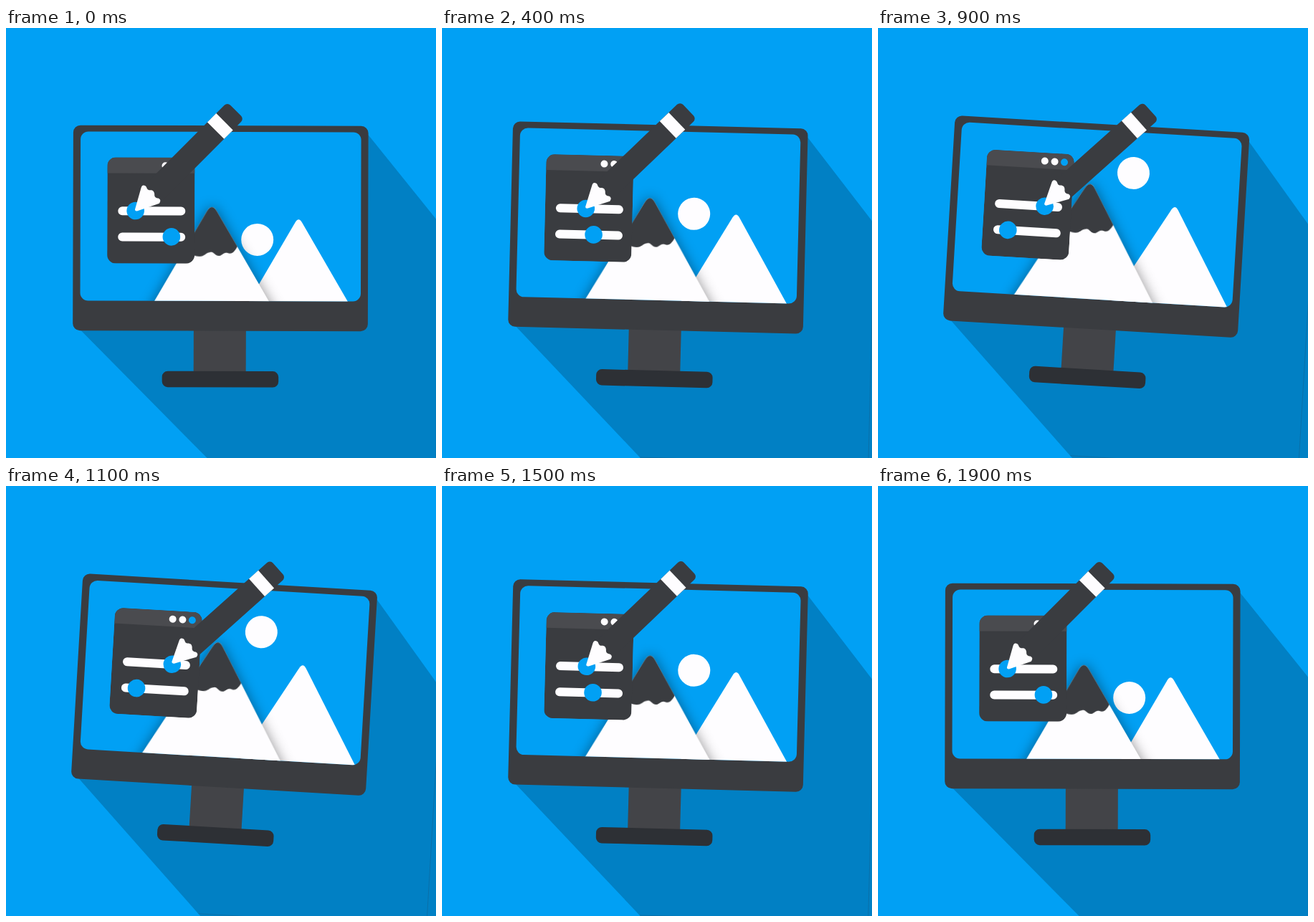
Recreate the animation shown at these times as an HTML page without scripts. Size 600 px wide and 600 px high, loop 2 s.

```html
<!DOCTYPE html>
<html lang="en">
<head>
<meta charset="utf-8">
<title>Photo editing on a desktop</title>
<style>
  @property --tick { syntax: "<number>"; inherits: true; initial-value: 0; }

  html, body { margin: 0; width: 100%; height: 100%; overflow: hidden; background: #01a0f4; }

  svg {
    display: block; width: 100vw; height: 100vh;
    animation: clock 2s steps(20) infinite;
    /* eased rise, then eased fall; --p is the pose from 0 to about 1 */
    --rise: clamp(0, var(--tick) * .1 + .02, 1);
    --fall: clamp(0, (var(--tick) - 10.05) / 8.75, 1);
    --p: calc(1.025 * (var(--rise) * var(--rise) * (3 - 2 * var(--rise))
                     - var(--fall) * var(--fall) * (3 - 2 * var(--fall))));
  }
  @keyframes clock { from { --tick: 0; } to { --tick: 20; } }

  .tilt { transform-origin: 343px 370px; transform: rotate(calc(.15deg + var(--p) * 3.25deg)); }
  .move { transform: translate(calc(var(--p) * var(--dx) * 1px), calc(var(--p) * var(--dy) * 1px)); }
  .sun    { --dx: -4;  --dy: -93; }
  .back   { --dx: -1;  --dy: -21; }
  .front  { --dx: 0;   --dy: -29; }
  .knob1  { --dx: 45;  --dy: 0; }
  .knob2  { --dx: -54; --dy: 0; }
  .pencil { --dx: 45;  --dy: -1.5; }
  .front  { filter: drop-shadow(0 0 9px rgba(0, 0, 0, .42)); }

  .dark  { fill: #3a3c40; }
  .white { fill: #fefdff; }
  .blue  { fill: #01a0f4; }
</style>
</head>
<body>
<svg viewBox="0 0 600 600">
  <defs>
    <clipPath id="screen"><rect x="103.5" y="145" width="391.5" height="236" rx="11"/></clipPath>
    <clipPath id="panel"><rect x="141" y="181" width="122" height="148" rx="12"/></clipPath>
  </defs>

  <g class="tilt">
    <!-- long shadow -->
    <path fill="#0180c4" d="M94 412 L481 801 H800 V513 L495 136.500Z"/>
    <path fill="none" stroke="#0a70aa" d="M282 600.700 H600.700 V267"/>

    <!-- monitor -->
    <rect x="262" y="415" width="73" height="70" fill="#434448"/>
    <rect x="218" y="479" width="162.500" height="22.500" rx="8" fill="#2d3035"/>
    <rect class="dark" x="93.300" y="136.300" width="411.700" height="286.500" rx="10"/>
    <rect class="blue" x="103.500" y="145" width="391.500" height="236" rx="11"/>

    <!-- landscape -->
    <g clip-path="url(#screen)">
      <circle class="move sun white" cx="350.500" cy="295.500" r="22.500"/>
      <path class="move back white" d="M305 440 L403.300 271 Q408 263 412.700 271 L511 440Z"/>
      <g class="move front">
        <path class="white" d="M173 440 L280 256 Q287 244 294 256 L401 440Z"/>
        <path class="dark" d="M251.400 305 L280 256 Q287 244 294 256 L322.600 305
          C318 314 314 316 309 314 C303 312 301 319 296 318
          C290 317 290 312 285 313 C278 314 277 319 270 319 C262 319 255 315 251.400 305Z"/>
      </g>
    </g>

    <!-- tool panel -->
    <g clip-path="url(#panel)">
      <path class="dark" d="M141 181 H263 V329 H141Z"/>
      <path fill="#4a4b4f" d="M141 181 H263 V203 H141Z"/>
    </g>
    <circle class="white" cx="222" cy="192.500" r="5"/>
    <circle class="white" cx="235.800" cy="192.500" r="5"/>
    <circle class="blue" cx="249.300" cy="192.500" r="5"/>
    <rect class="white" x="156" y="249.700" width="94" height="12" rx="6"/>
    <rect class="white" x="156" y="286" width="94" height="12" rx="6"/>
    <circle class="move knob1 blue" cx="180.300" cy="255.500" r="12.300"/>
    <circle class="move knob2 blue" cx="230.700" cy="291.700" r="12.300"/>

    <!-- pencil, drawn along the x axis with its tip at the origin -->
    <g class="move pencil">
      <g transform="translate(181 255) rotate(-45.2)">
        <rect class="dark" x="30" y="-16.500" width="167" height="33" rx="6"/>
        <path class="white" d="M157.500 -16.500 H175 V16.500 H157.500Z"/>
        <path class="white" d="M0 -2 L27 -17 Q32 -20 33.500 -15 C34 -12 31 -10 33 -7
          C37 -4 37 -1 34.500 2 C31 5 32 8 34 10 Q36 15 30 16 L1 2 Q-2 0 0 -2Z"/>
      </g>
    </g>
  </g>
</svg>
</body>
</html>
```
